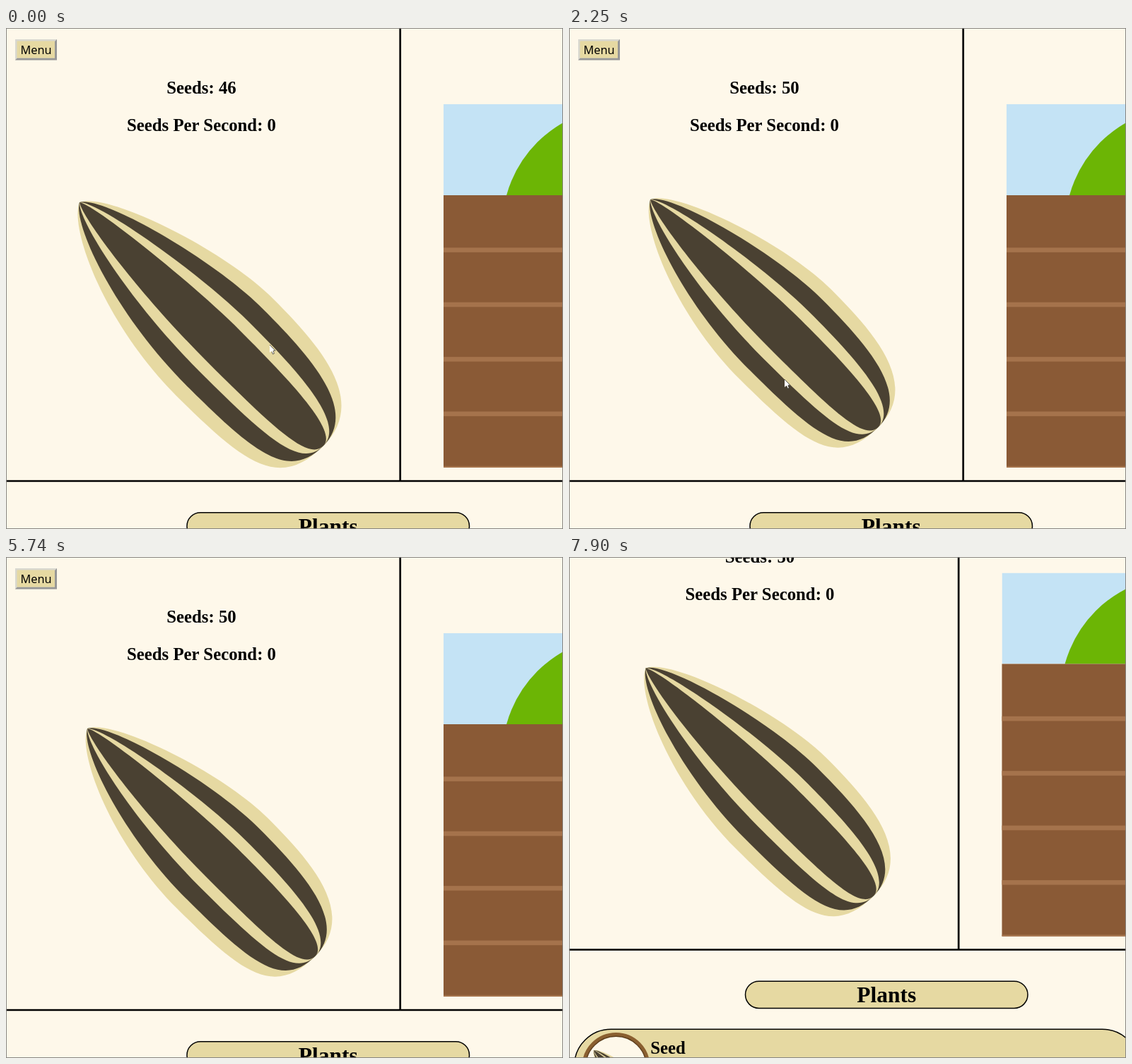
Write an HTML page that moves like this. It is 788 px wide and 710 px high and loops after 8 s.

```html
<!DOCTYPE html>
<html lang="en">
<head>
<meta charset="utf-8">
<title>Seed clicker</title>
<style>
  html, body { margin: 0; width: 100%; height: 100%; overflow: hidden; background: #fef8ea; }
  svg { display: block; }
  text { font: bold 24.8px "Liberation Serif", "Times New Roman", serif; }
  .mid { text-anchor: middle; }
  #title { font-size: 31.5px; }
  #menu { font: 16.3px "Noto Sans", "Open Sans", sans-serif; }
  .box { fill: #e6d9a2; stroke: #000; stroke-width: 1.5; }
</style>
</head>
<body>
<svg width="788" height="710" viewBox="0 0 788 710">
  <defs>
    <!-- Tip at the origin, long axis along x; stripes are narrower copies of the hull -->
    <path id="hull" d="M0 0C17 38 150 97 290 97S488 88 488 0S390 -97 290 -97S17 -38 0 0Z"/>
    <g id="kernel"></g>
    <clipPath id="sky"><rect x="619" y="108" width="300" height="129"/></clipPath>
  </defs>
  <rect width="788" height="710" fill="#fef8ea"/>
  <g id="page">
    <rect x="13" y="16" width="59" height="29.5" fill="#d9d8d0"/>
    <path d="M72 16V45.5H13L16 42.5H69V19Z" fill="#979797"/>
    <rect x="15.5" y="18.5" width="53.5" height="24" fill="#e6d9a2"/>
    <text id="menu" class="mid" x="42.5" y="37.3">Menu</text>

    <text id="count" class="mid" x="276.5" y="93.3">Seeds: 46</text>
    <text class="mid" x="276.5" y="146">Seeds Per Second: 0</text>
    <g id="seed"><use href="#kernel" transform="translate(104 247) rotate(45)"/></g>

    <g clip-path="url(#sky)">
      <rect x="619" y="108" width="300" height="129" fill="#c4e3f5"/>
      <circle cx="872" cy="282" r="170" fill="#6cb505"/>
    </g>
    <rect x="619" y="237" width="300" height="386" fill="#8a5a36"/>
    <g id="furrows" fill="#a5734c"></g>

    <path d="M557.7 -5V642M-20 642H900" stroke="#000" stroke-width="2.7"/>

    <rect class="box" x="256" y="686.7" width="399.5" height="38.3" rx="19.2"/>
    <text id="title" class="mid" x="455.7" y="716.8">Plants</text>

    <rect class="box" x="14" y="754.7" width="799" height="140" rx="52"/>
    <circle cx="73" cy="807.5" r="45.5" fill="#fef8ea" stroke="#8a5f30" stroke-width="5"/>
    <circle cx="73" cy="807.5" r="42.8" fill="none" stroke="#5d3d1b" stroke-width="1.4"/>
    <use href="#kernel" transform="translate(41.5 784.5) scale(.17) rotate(45)"/>
    <text x="121.7" y="789.3">Seed</text>
  </g>
  <g id="pointer">
    <path d="M0 0V11L2.6 8.8L4.5 13L6.3 12.2L4.6 8.2H8Z" fill="#fff"/>
    <path d="M0 0L8 8.2H4.8M5 9L6.5 12.2L4.5 13.2L3 9.8" fill="none" stroke="#3c3830" stroke-width=".8"/>
  </g>
  <rect x=".5" y=".5" width="787" height="709" fill="none" stroke="#878581"/>
</svg>
<script>
const LOOP = 8000, STEP = 125;
const HOVER_END = 3270, POINTER_END = 5740;
const $ = id => document.getElementById(id);

$('kernel').innerHTML = [1, .79, .51, .33].map((width, i) =>
  `<use href="#hull" transform="scale(1 ${width})" fill="${i % 2 ? '#4a4132' : '#e6d9a2'}"/>`).join('');

$('furrows').innerHTML = Array.from({ length: 5 }, (_, i) =>
  `<rect x="619" y="${311.3 + i * 77.4}" width="300" height="${i < 4 ? 6.6 : 2.1}"/>`).join('');

// Press and release times
const clicks = [[250, 500], [990, 1240], [1610, 1730], [2250, 2500]];

// Key points: [ms, x, y]
const pointerPath = [[370, 373, 449], [740, 305, 498], [2865, 305, 498], [3115, 299, 308],
  [3990, 308, 112], [4390, 277, 104], [4870, 320, 101], [5115, 301, 102],
  [5250, 320, 101], [5620, 352, 58]];
const scrollPath = [[6780, 0, 0], [7025, 0, 22.5], [7150, 0, 22.5], [7400, 0, 60.5], [7900, 6.5, 85.5]];

// Motion advances in even steps
const snap = (t, phase) => Math.floor((t - phase) / STEP) * STEP + phase;

function along(path, t) {
  const next = path.findIndex(key => key[0] > t);
  if (next < 1) return path.at(next).slice(1);
  const [t0, x0, y0] = path[next - 1], [t1, x1, y1] = path[next];
  const p = (t - t0) / (t1 - t0);
  return [x0 + (x1 - x0) * p, y0 + (y1 - y0) * p];
}

function place(id, x, y, scale = 1) {
  $(id).setAttribute('transform', `translate(${x} ${y}) scale(${scale})`);
}

function draw(t) {
  const pressed = clicks.some(([down, up]) => t >= down && t < up);
  const grown = t < HOVER_END && !pressed;
  if (grown) place('seed', 0, 0);
  else place('seed', 17.8, 12, .935);

  $('count').textContent = 'Seeds: ' + (46 + clicks.filter(([down]) => t >= down).length);

  const [x, y] = along(scrollPath, snap(t, 25));
  place('page', -x, -y);

  place('pointer', ...along(pointerPath, snap(t, -10)));
  $('pointer').style.display = t < POINTER_END ? '' : 'none';
}

function tick() {
  draw(performance.now() % LOOP);
  requestAnimationFrame(tick);
}
tick();
</script>
</body>
</html>
```
